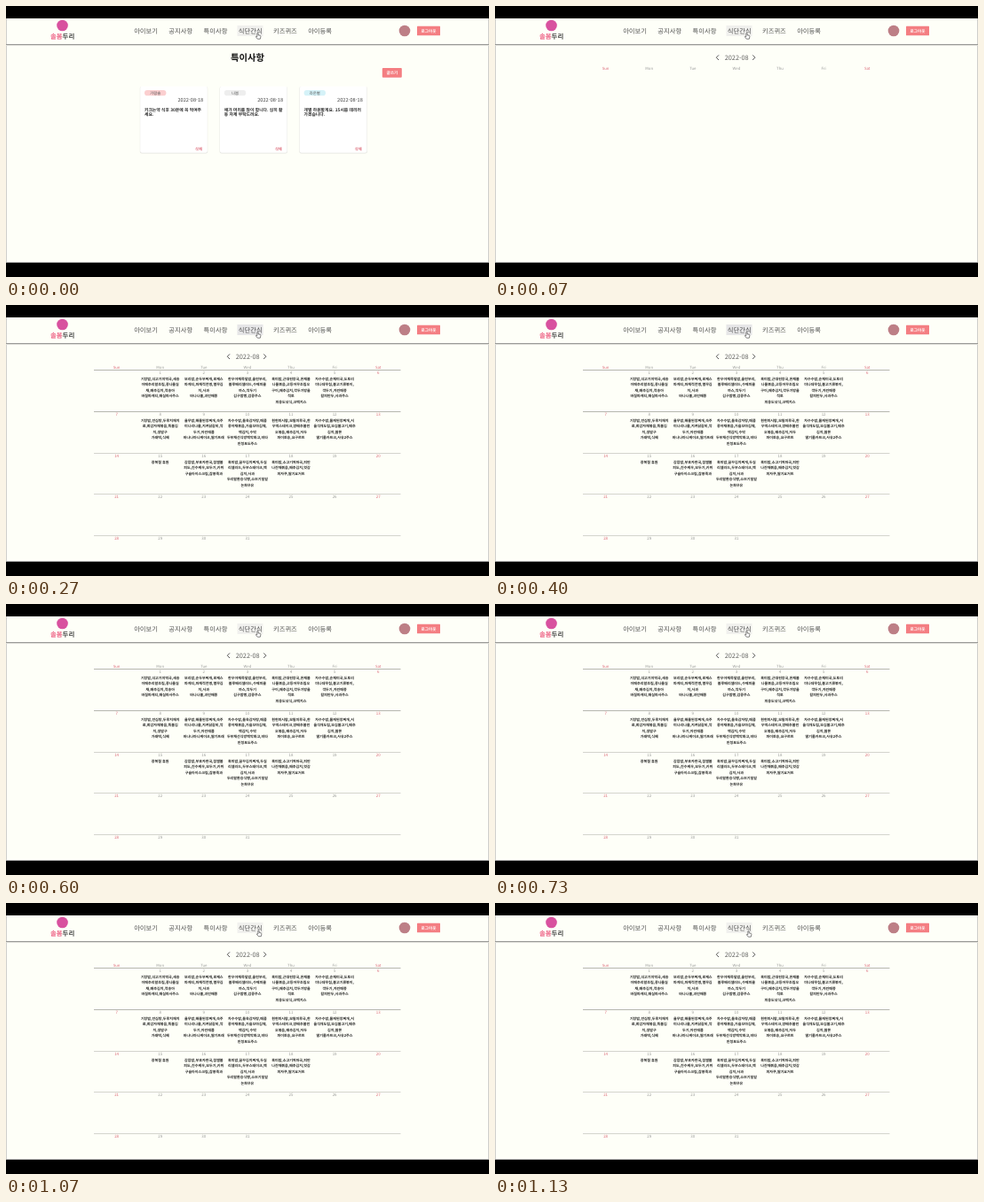
An HTML page for the animation above (1190 ms loop, 544 by 306 pixels).

```html
<!DOCTYPE html>
<html lang="ko">
<head>
<meta charset="utf-8">
<style>
  html, body { margin: 0; width: 100%; height: 100%; overflow: hidden; background: #000; }
  svg { display: block; width: 100%; height: 100%; }
  text { font-family: "Noto Sans CJK KR", "Noto Sans CJK", sans-serif; text-rendering: geometricPrecision; white-space: pre; }
</style>
</head>
<body>
<svg id="stage" viewBox="0 0 544 306"></svg>
<script>
const LOOP = 1190;
const INK = '#222', GREY = '#999', PINK = '#f47e82', RED = '#dc6978';
const PAPER = '#fefff8';

// y is the optical middle of the line
const text = (x, y, size, string, { fill = INK, weight = 400, anchor = 'middle' } = {}) =>
  `<text x="${x}" y="${(y + size * 0.37).toFixed(2)}" font-size="${size}" fill="${fill}" font-weight="${weight}" text-anchor="${anchor}">${string}</text>`;
const rect = (x, y, w, h, fill, extra = '') =>
  `<rect x="${x}" y="${y}" width="${w}" height="${h}" fill="${fill}" ${extra}/>`;
const line = (x1, y1, x2, y2, stroke, width = 1) =>
  `<path d="M${x1} ${y1}L${x2} ${y2}" stroke="${stroke}" stroke-width="${width}"/>`;

const menu = ['아이보기', '공지사항', '특이사항', '식단간식', '키즈퀴즈', '아이등록'];

function header() {
  return '<circle cx="63.5" cy="22" r="6.3" fill="#d8519f"/>'
    + text(50, 34, 7.4, '솔봄<tspan fill="#444">두리</tspan>', { fill: '#ee6688', weight: 700, anchor: 'start' })
    + '<g id="hover"></g>'
    + menu.map((label, i) => text(157.6 + i * 39.2, 27.8, 7.3, label, { fill: '#505050', weight: 500 })).join('')
    + '<circle cx="449" cy="28" r="6.3" fill="#bd7f86"/>'
    + rect(463, 22.8, 26, 10.4, PINK, 'rx=".5"')
    + text(476, 28, 4.6, '로그아웃', { fill: '#fff', weight: 700 })
    + line(0, 43.5, 544, 43.5, '#999996')
    + line(0, 44.5, 544, 44.5, '#e0e0da');
}

const notes = [
  ['가람솔', '#fbcfd0', '키크는약 식후 30분에 꼭 먹여주', '세요.'],
  ['나봄', '#eeeeee', '얘가 머리를 많이 합니다. 심히 활', '동 자제 부탁드려요.'],
  ['라온별', '#d5f2f8', '개별 하원할게요. 15시쯤 데리러', '가겠습니다.'],
];

function noteCard([name, color, ...body], i) {
  const x = 151.2 + i * 89.8;
  const left = { weight: 700, anchor: 'start' };
  return rect(x - 0.4, 91, 76.4, 75.6, '#e4e4df', 'rx="2"')
    + rect(x, 90.7, 75.6, 75, '#fff', 'rx="2"')
    + rect(x + 4.8, 95, 24.4, 6.3, color, 'rx="3.1"')
    + text(x + 17, 98.2, 4.4, name, { fill: '#555', weight: 500 })
    + text(x + 71, 105.8, 5.6, '2022-08-18', { fill: '#444', anchor: 'end' })
    + body.map((row, n) => text(x + 4.8, 116.8 + n * 5.7, 4.8, row, left)).join('')
    + text(x + 69.8, 161, 4.3, '삭제', { fill: RED, weight: 700, anchor: 'end' });
}

function notesPage() {
  return text(272, 57.8, 10.3, '특이사항', { fill: '#111', weight: 700 })
    + rect(423.8, 70, 22, 10.8, PINK, 'rx="1"')
    + text(434.8, 75.3, 4.6, '글쓰기', { fill: '#fff', weight: 700 })
    + notes.map(noteCard).join('');
}

const columnX = column => 124.6 + column * 49.1;
const rowY = row => Math.floor(73.5 + row * 46.75) + 0.5;
const weekendStyle = column => column % 6 ? { fill: GREY } : { fill: RED, weight: 500 };

function calendarHead() {
  const days = ['Sun', 'Mon', 'Tue', 'Wed', 'Thu', 'Fri', 'Sat'];
  return text(272.2, 58.2, 7.3, '2022-08', { fill: '#606060' })
    + '<path d="M252 55.4l-2.7 2.8 2.7 2.8M290.2 55.4l2.7 2.8-2.7 2.8" fill="none" stroke="#444" stroke-width=".9"/>'
    + days.map((day, i) => text(columnX(i), 70.2, 4.3, day, weekendStyle(i))).join('');
}

// "|" breaks a line, "/" starts the snack
const meals = {
  1: '기장밥,쇠고기미역국,새송|이메추리알조림,콩나물실|채,배추김치,적송아/바질파게티,매실파사주스',
  2: '보리밥,순두부찌개,로제스|파게티,파채적전병,열무김|치,사과/바나나볼,과인매종',
  3: '한우야채죽덮밥,올린부리,|블루베리샐러드,수제피클|까스,깍두기/김구함빵,검콩주스',
  4: '흑미밥,근대된장국,돈채불|나물볶음,고등어무조림오|구이,배추김치,깍두기방울|적토/피웅도넛식,크백치스',
  5: '차수수밥,순채미국,도토리|미나데무침,불고기류볶이,|깍두기,자인매종/칼피만두,사과주스',
  8: '기장밥,안심탕,두루치채치|료,회감자채볶음,뚝불김|치,생밤구/가래떡,식혜',
  9: '율무밥,해물된장찌개,숙주|미나리나물,지켜닭갈비,깍|두기,자인애플/바나나마니케이크,딸기프래',
  10: '차수수밥,돌육감자탕,매콤|콩야채볶음,가을꼬마김채,|백김치,수박/두부채선식방백악화고,비타|민청포도주스',
  11: '흰현미시팝,모밀미루국,한|우떡스테이크,양배추불린|오볶음,배추김치,자두/파이토숭,요구르트',
  12: '차수수밥,물캐된장찌개,서|울석개도림,모심불고기,배추|김치,딸폰/딸기롤카프크,사유2주스',
  15: '광복절 휴원',
  16: '감잡밥,부호자한국,찹쌀볼|피도,진수케우,모두기,키위/구슬아이스크림,잡봉죽과',
  17: '흑미밥,꿈꾸김치찌개,두실|리샐러드,두부스테이크,백|김치,사과/두리알환승식빵,소브기일잎|논화우유',
  18: '흑미밥,소고기쳐파국,피만|나잔채볶음,배추김치,멋감/피자쿠,딸기요거트',
};

function dayCell(day) {
  const column = day % 7;
  const x = columnX(column);
  const top = rowY(Math.floor(day / 7));
  let y = top + 4.2;
  let cell = text(x, top + 3.1, 4.4, day, weekendStyle(column));
  for (const part of (meals[day] || '').split('/')) {
    for (const row of part.split('|')) {
      y += 6.1;
      cell += text(x, y, 4.05, row, { weight: 700 });
    }
    y += 0.8;
  }
  return cell;
}

function calendarBody() {
  const days = Array.from({ length: 31 }, (_, i) => i + 1);
  const rules = [0, 1, 2, 3, 4].map(row =>
    line(99, rowY(row), 444.5, rowY(row), row < 2 ? '#b6b6b0' : '#d4d4ce'));
  return rules.join('') + days.map(dayCell).join('');
}

const stage = document.getElementById('stage');
stage.innerHTML = rect(0, 0, 544, 306, '#000')
  + rect(0, 14, 544, 276, PAPER)
  + line(0.3, 14, 0.3, 290, '#aaa', 0.7) + line(543.7, 14, 543.7, 290, '#aaa', 0.7)
  + line(0, 289.5, 544, 289.5, '#aaa')
  + header()
  + `<g id="notes">${notesPage()}</g>`
  + `<g id="calendarHead">${calendarHead()}</g>`
  + `<g id="calendarBody">${calendarBody()}</g>`
  + `<path id="cursor" d="M-1.1-3.2q.7-.7 1.2 0v2.3l2.2.5q.7.3.6 1.1l-.6 2.7h-3l-2-2.5q.2-.9 1.6-.1z"
       fill="#fff" stroke="#333" stroke-width=".6"/>`;

const part = id => document.getElementById(id);
const show = (id, visible) => part(id).setAttribute('display', visible ? 'inline' : 'none');

function hoverShade(t) {
  if (t < 130) return rect(260.5, 22, 29, 12, '#f0f0ed');
  if (t < 200) return rect(260.5, 22, 15, 12, '#f0f0ed') + rect(275.5, 22, 14, 12, '#c9c9c9');
  return rect(260.5, 22, 29, 12, t < 600 ? '#e6e6e7' : '#f1f1ee');
}

function render(t) {
  show('notes', t < 70);
  show('calendarHead', t >= 70);
  show('calendarBody', t >= 130);
  part('hover').innerHTML = hoverShade(t);
  const [x, y] = t < 1070 ? [284, 33.8] : t < 1130 ? [285, 34.3] : [286, 34.8];
  part('cursor').setAttribute('transform', `translate(${x} ${y})`);
}

const start = performance.now();
function tick() {
  render((performance.now() - start) % LOOP);
  requestAnimationFrame(tick);
}
tick();
</script>
</body>
</html>
```
